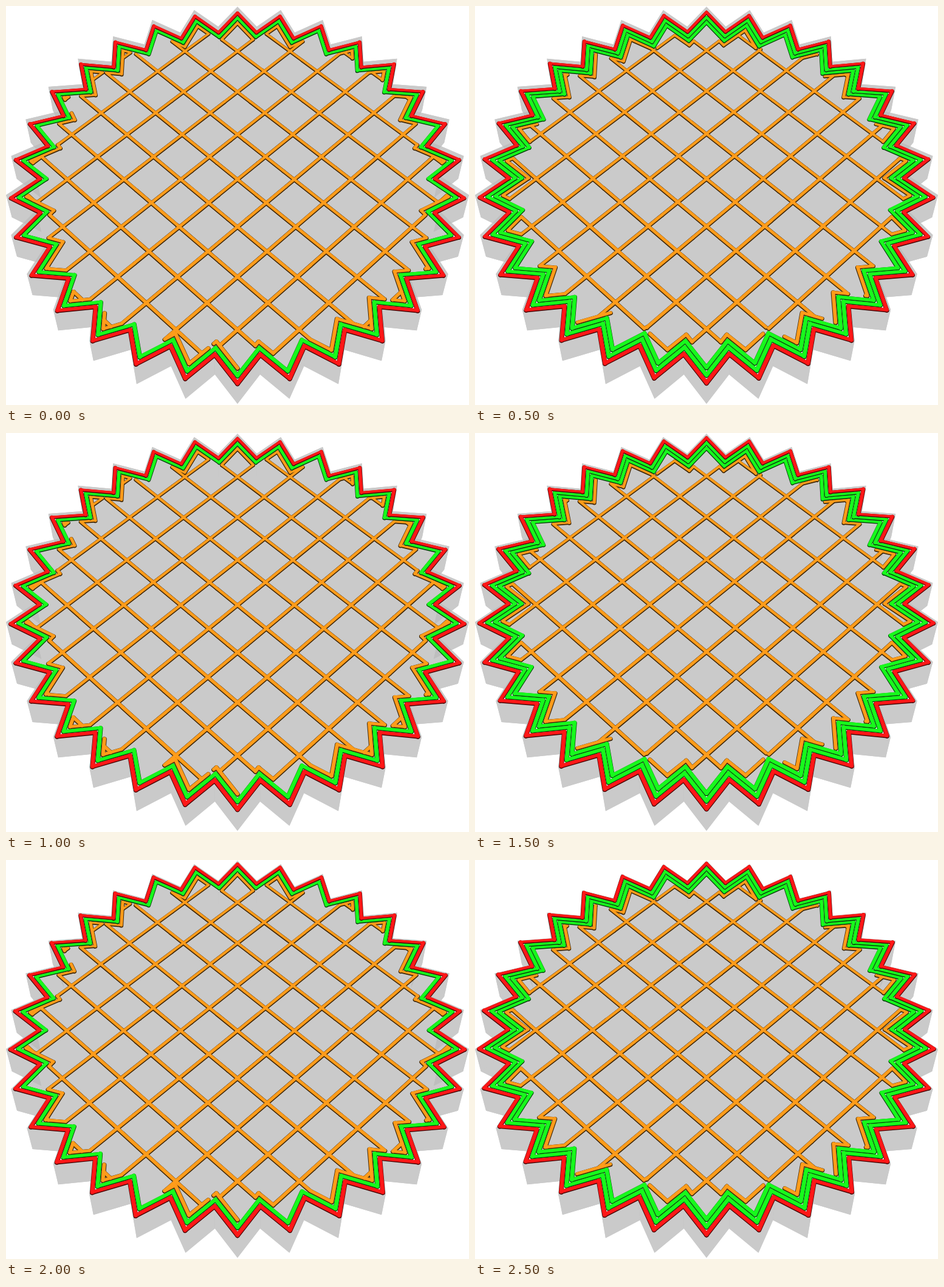
Animation of 762x657 px, one loop 3000 ms. Source, as an HTML page with a canvas:

```html
<!DOCTYPE html>
<html lang="en">
<head>
<meta charset="utf-8">
<title>Sliced star layers</title>
<style>
html, body { margin: 0; width: 100%; height: 100%; overflow: hidden; background: #fff; }
canvas { display: block; width: 762px; height: 657px; }
</style>
</head>
<body>
<canvas id="stage" width="762" height="657"></canvas>
<script>
const ctx = document.getElementById('stage').getContext('2d');

const TIPS = 30, LAYERS = 6, HOLD = 500;
const BEAD = 0.0195;           // extrusion width, star radius = 1
const LAYER_STEP = 0.0051;
const GRID = 0.2515, GRID_Y = -0.004;
const BODY_TOP = -0.026, BODY_BOTTOM = 0.149;
const SCALE_X = 371, SCALE_Y = 301.7;

const RED = ['#ff1717', '#480404'];
const GREEN = ['#17fa1c', '#043c08'];
const ORANGE = ['#ff9c1a', '#40280a'];
const GREY = '#cacaca', SHADE = '#bebebe';

// Stretches of wall followed by the infill; whole numbers are tips, clockwise from the top.
const LINKS = [
  [[-0.44, 0.44], [0.75, 1.7], [-1.7, -0.75], [2.85, 3.12], [-3.7, -2.8], [3.82, 4.15],
   [-4.75, -3.8], [4.7, 5.7], [-5.05, -4.9], [-5.75, -5.35], [6.5, 7.06], [-7.06, -6.5],
   [7.93, 8.57], [-8.57, -7.93], [9.25, 10.12], [-10.3, -9.25], [10.3, 11.25],
   [-11.3, -10.75], [11.35, 12.2], [-12.25, -11.75], [12.2, 13.3], [-14.35, -13.3],
   [-15, -14.45], [14.3, 14.55]],
  [[-0.85, -0.4], [0.4, 1.45], [-2.7, -1.65], [-3.8, -3.05], [-4.8, -3.9], [2.8, 3],
   [3.6, 4.75], [5.7, 6.3], [-6.3, -5.7], [6.9, 8.05], [-8.1, -6.85], [8.6, 9.3],
   [-9.3, -8.6], [-11.2, -10.25], [10.2, 11.05], [11.2, 12], [12.2, 13.2],
   [-12.5, -12], [-13.55, -13.4], [-14.6, -14.1], [14.15, 14.6]]
];

const depth = (y, h) => 1 + 0.105 * y + 0.1457 * h;

function project([x, y], h) {
  const w = depth(y, h);
  return [381 + SCALE_X * x / w, 284.4 + (216 * h - SCALE_Y * y) / w];
}

// Corner v of the star wall, inset by a number of beads; even corners are tips.
function corner(v, inset) {
  const r = v % 2 ? 0.876 - 1.51 * BEAD * inset : 1 - 1.73 * BEAD * inset;
  const a = v * Math.PI / TIPS;
  return [r * Math.sin(a), r * Math.cos(a)];
}

const mix = (a, b, t) => [a[0] + (b[0] - a[0]) * t, a[1] + (b[1] - a[1]) * t];

function wallPoint(u, inset) {
  const v = Math.floor(u * 2);
  return mix(corner(v, inset), corner(v + 1, inset), u * 2 - v);
}

function star(inset) {
  return Array.from({ length: TIPS * 2 + 1 }, (_, i) => corner(i - TIPS, inset));
}

function gridHits(s, c, inset) {
  const side = p => p[0] + s * (p[1] - GRID_Y) - c;
  const hits = [];
  for (let v = -TIPS; v < TIPS; v++) {
    const a = corner(v, inset), b = corner(v + 1, inset);
    const fa = side(a), fb = side(b);
    if ((fa < 0) === (fb < 0)) continue;
    const t = fa / (fa - fb);
    hits.push({ u: (v + t) / 2, p: mix(a, b, t) });
  }
  return hits.sort((a, b) => a.p[0] - b.p[0]);
}

function infill(kind) {
  const inset = 2 + kind, paths = [], ends = [];
  for (const s of [-1, 1]) {
    for (let k = -5; k <= 5; k++) {
      const hits = gridHits(s, k * GRID, inset);
      for (let i = 0; i + 1 < hits.length; i += 2) {
        const a = hits[i].p, b = hits[i + 1].p;
        const n = Math.ceil((b[0] - a[0]) / 0.2);
        paths.push(Array.from({ length: n + 1 }, (_, j) => mix(a, b, j / n)));
      }
      ends.push(...hits.map(hit => hit.u));
    }
  }
  const snap = u => ends.find(e => Math.abs(e - u) < 0.1) ?? u;
  for (const [from, to] of LINKS[kind]) {
    const a = snap(from), b = snap(to), path = [wallPoint(a, inset)];
    for (let v = Math.floor(a * 2) + 1; v < b * 2; v++) path.push(corner(v, inset));
    path.push(wallPoint(b, inset));
    paths.push(path);
  }
  return paths;
}

function trace(points) {
  ctx.beginPath();
  for (const p of points) ctx.lineTo(p[0], p[1]);
  ctx.closePath();
}

function fill(points, color) {
  trace(points);
  ctx.fillStyle = color;
  ctx.fill();
}

function beads(paths, h, [color, edge], trim) {
  const segments = [];
  for (const path of paths) {
    for (let i = 1; i < path.length; i++) {
      const a = path[i - 1], b = path[i];
      const p = project(a, h), q = project(b, h);
      const length = Math.hypot(q[0] - p[0], q[1] - p[1]);
      if (length < 0.01) continue;
      const w = depth((a[1] + b[1]) / 2, h);
      const stretch = Math.hypot(b[0] - a[0], b[1] - a[1]) / length;
      segments.push([p, q, BEAD * SCALE_X * SCALE_Y * stretch / w ** 3]);
    }
  }
  const pass = (style, cut, dy) => {
    ctx.strokeStyle = style;
    for (const [p, q, width] of segments) {
      ctx.lineWidth = width - cut;
      ctx.beginPath();
      ctx.moveTo(p[0], p[1] + dy);
      ctx.lineTo(q[0], q[1] + dy);
      ctx.stroke();
    }
  };
  pass(edge, 0, 0.6);
  pass(color, trim, -0.2);
}

function wall(v) {
  const a = corner(v, -0.5), b = corner(v + 1, -0.5);
  return [project(a, BODY_TOP), project(b, BODY_TOP), project(b, BODY_BOTTOM), project(a, BODY_BOTTOM)];
}

function drawBody() {
  const outline = star(-0.5);
  for (const h of [BODY_BOTTOM, BODY_TOP]) fill(outline.map(p => project(p, h)), GREY);
  for (let v = 0; v < TIPS * 2; v++) fill(wall(v), GREY);
}

function drawOverlaps() {
  for (let v = 0; v < TIPS * 2; v += 2) {
    ctx.save();
    trace(wall(v));
    ctx.clip();
    fill(wall(v + 1), SHADE);
    ctx.restore();
  }
}

const fills = [infill(0), infill(1)];

function drawLayer(layer) {
  const kind = layer % 2, h = -layer * LAYER_STEP;
  ctx.fillStyle = '#fff';
  ctx.fillRect(0, 0, 762, 657);
  ctx.lineCap = 'round';
  drawBody();
  fill(star(0).map(p => project(p, h)), '#fff');
  fill(star(1 + kind).map(p => project(p, h)), GREY);
  drawOverlaps();
  beads(fills[kind], h, ORANGE, 1.9);
  for (let i = 1 + kind; i > 0; i--) beads([star(i)], h, GREEN, 1.3);
  beads([star(0)], h, RED, 1.3);
}

let shown = -1;
function tick(now) {
  const layer = Math.floor(now / HOLD) % LAYERS;
  if (layer !== shown) drawLayer(shown = layer);
  requestAnimationFrame(tick);
}
tick(performance.now());
</script>
</body>
</html>
```
